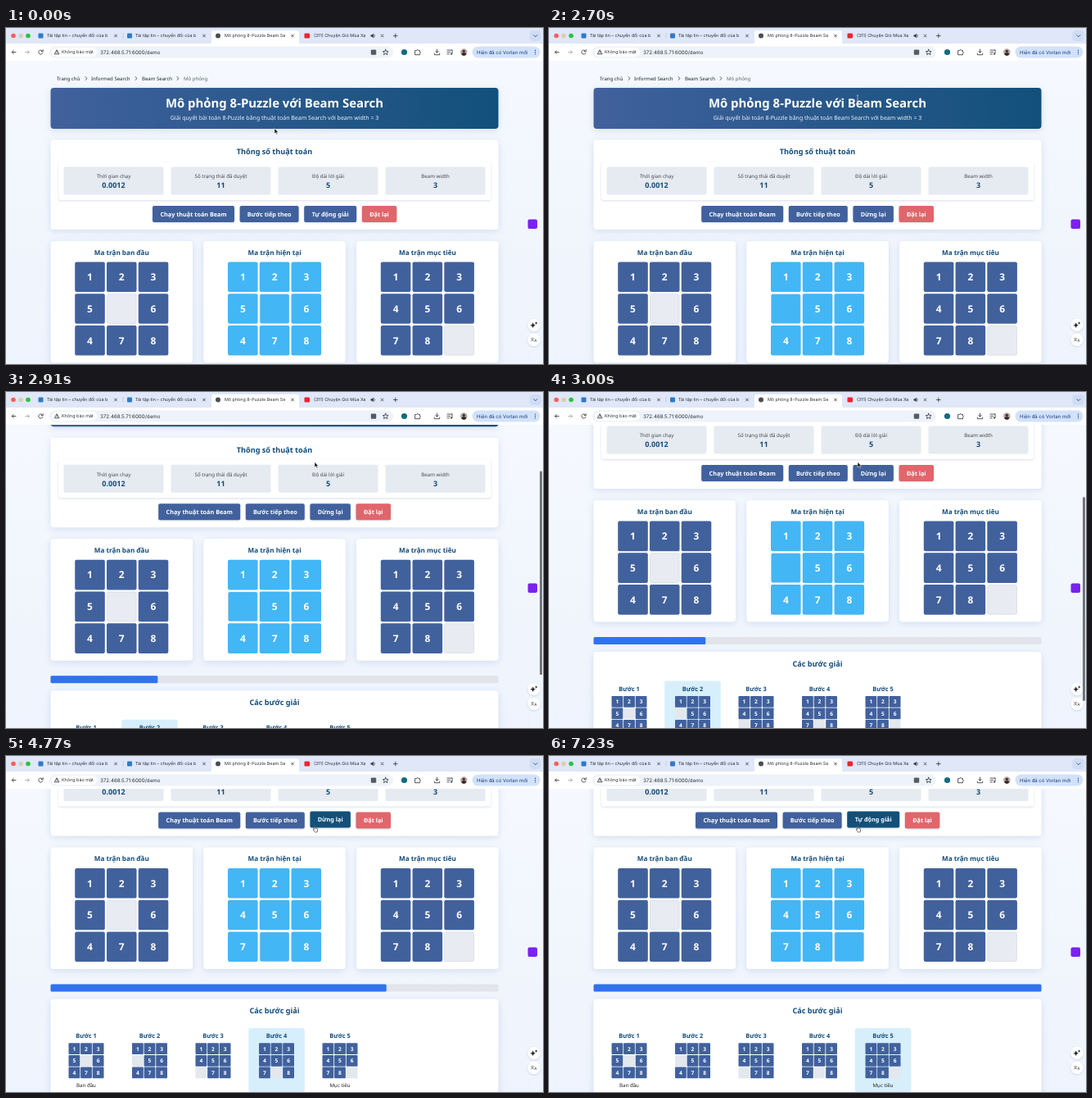
An HTML page that plays this animation: 656 px wide and 410 px high, repeating every 7.59 s.

```html
<!DOCTYPE html>
<html lang="vi">
<head>
<meta charset="utf-8">
<title>8-Puzzle</title>
<style>
html, body { margin: 0; width: 100%; height: 100%; overflow: hidden; background: #f2f6fd; }
svg { display: block; font-family: "Noto Sans", "Open Sans", sans-serif; text-rendering: geometricPrecision; }
.ui { font-family: Inter, Roboto, sans-serif; }
.mid { text-anchor: middle; }
.bold { font-weight: 700; }
.card { filter: drop-shadow(0 2px 4px rgba(60, 100, 170, .17)); }
.soft { filter: drop-shadow(0 1px 1px rgba(60, 90, 140, .2)); }
.line { fill: none; stroke: #41454c; stroke-width: .9; stroke-linecap: round; stroke-linejoin: round; }
</style>
</head>
<body>
<svg width="656" height="410" viewBox="0 0 656 410">
  <defs>
    <linearGradient id="banner"><stop stop-color="#41619d"/><stop offset="1" stop-color="#12507b"/></linearGradient>
    <linearGradient id="sky" x2="0" y2="1"><stop stop-color="#f6f9fe"/><stop offset="1" stop-color="#eef4fd"/></linearGradient>
  </defs>
  <rect width="656" height="410" fill="url(#sky)"/>
  <g id="page"><g id="fixed"></g><g id="live"></g></g>
  <g id="browser" class="ui"></g>
  <g id="over"></g>
</svg>
<script>
const LOOP = 7590, BLUE = '#41619d', NAVY = '#124c7c', SKY = '#43b6f5';
const TICK = 2697, PERIOD = 900, FADE = 270;
const BOARDS = ['1235 6478', '123 56478', '123456 78', '1234567 8', '12345678 '];
const $ = id => document.getElementById(id);

const rect = (x, y, w, h, r, fill, more = '') =>
  `<rect x="${x}" y="${y}" width="${w}" height="${h}" rx="${r}" fill="${fill}" ${more}/>`;
const text = (s, x, y, size, fill, cls = 'mid') =>
  `<text x="${x}" y="${y + size * .36}" font-size="${size}" fill="${fill}" class="${cls}">${s}</text>`;
const bold = (s, x, y, size, fill) => text(s, x, y, size, fill, 'mid bold');
const circle = (x, y, r, fill, more = '') => `<circle cx="${x}" cy="${y}" r="${r}" fill="${fill}" ${more}/>`;
const line = (d, more = '') => `<path class="line" d="${d}" ${more}/>`;

const ramp = (t, a, b) => Math.min(1, Math.max(0, (t - a) / (b - a)));
const smooth = x => x * x * (3 - 2 * x);
const easeOut = x => 1 - (1 - x) ** 2;
const blend = (a, b, k) => `rgb(${a.map((v, i) => Math.round(v + (b[i] - v) * k))})`;

function board(cells, x, y, fill, empty) {
  return [...cells].map((n, i) => {
    const cx = x + i % 3 * 38.75, cy = y + Math.floor(i / 3) * 38.75;
    return n === ' '
      ? rect(cx + .4, cy + .4, 35.8, 35.8, 2, empty, 'stroke="#bcc5d3" stroke-width=".7" stroke-dasharray="1.4 1"')
      : rect(cx, cy, 36.6, 36.6, 2, fill) + bold(n, cx + 18.3, cy + 18.3, 11.9, '#fff');
  }).join('');
}

function miniBoard(cells, x, y) {
  return [...cells].map((n, i) => {
    const cx = x + i % 3 * 14.6, cy = y + Math.floor(i / 3) * 14.6;
    return rect(cx, cy, 13.8, 13.8, .8, n === ' ' ? '#e3e7ee' : BLUE) +
      bold(n, cx + 6.9, cy + 6.9, 6.6, '#fff');
  }).join('');
}

const stepX = i => 98 + i * 77.5;

function drawPage() {
  const crumbs = [['Trang chủ', 62], ['Informed Search', 104], ['Beam Search', 166], ['Mô phỏng', 217]];
  const stats = [['Thời gian chạy', '0.0012'], ['Số trạng thái đã duyệt', '11'], ['Độ dài lời giải', '5'], ['Beam width', '3']];
  const titles = ['Ma trận ban đầu', 'Ma trận hiện tại', 'Ma trận mục tiêu'];
  $('fixed').innerHTML =
    crumbs.map(([s, x], i) => text(s, x, 61.5, 6.05, i < 3 ? '#1d2530' : '#5d6570', '')).join('') +
    [97, 158, 209].map(x => line(`M${x} 59.5l2 2-2 2`, 'stroke-width=".6"')).join('') +
    rect(54.5, 73, 547, 50, 4, 'url(#banner)', 'class="card"') +
    bold('Mô phỏng 8-Puzzle với Beam Search', 328, 91.7, 14.9, '#fff') +
    text('Giải quyết bài toán 8-Puzzle bằng thuật toán Beam Search với beam width = 3', 328, 109, 7, '#eef3fa') +
    rect(54.5, 136.5, 547, 109.5, 4, '#fff', 'class="card"') +
    bold('Thông số thuật toán', 328, 151, 9.12, NAVY) +
    rect(64, 163.5, 528.5, 46.5, 3, '#fff', 'class="soft"') +
    stats.map(([name, value], i) => {
      const x = 70.5 + i * 131;
      return rect(x, 169.5, 122, 34, 2, '#e6eaf1') +
        text(name, x + 61, 181, 6.15, '#444b55') + bold(value, x + 61, 192, 9, NAVY);
    }).join('') +
    titles.map((s, i) => {
      const x = 54.5 + i * 186.8;
      return rect(x, 260, 173.6, 148.5, 4, '#fff', 'class="card"') + bold(s, x + 86.8, 273.7, 8.15, NAVY);
    }).join('') +
    board(BOARDS[0], 84.2, 285.5, BLUE, '#e8ecf2') +
    board(BOARDS[4], 457.8, 285.5, BLUE, '#e8ecf2') +
    rect(54.5, 427, 547, 9, 2, '#e1e4ea') +
    rect(54.5, 445, 547, 140, 4, '#fff', 'class="card"') +
    bold('Các bước giải', 328, 459.7, 9.12, NAVY);
}

function drawBrowser() {
  const ink = '#2b2f36';
  const cross = x => line(`M${x - 1.4} 8.1l2.8 2.8m0-2.8l-2.8 2.8`, 'stroke-width=".6"');
  const file = 'Tải tập tin – chuyển đổi của b';
  const label = (s, x, y, size) => text(s, x, y, size, ink, '');
  $('browser').innerHTML =
    rect(0, 0, 656, 20, 0, '#dfe7f8') + rect(0, 19, 656, 21, 0, '#fff') +
    circle(9, 9.5, 2.8, '#fb5e58') + circle(18, 9.5, 2.8, '#dccfae') + circle(27, 9.5, 2.8, '#2ac23f') +
    rect(39.5, 6.5, 6, 6, 1, '#2d7bc9') + label(file, 50, 9.5, 5.4) + cross(134) +
    rect(148, 6.5, 6, 6, 1, '#2d7bc9') + label(file, 158, 9.5, 5.4) + cross(242) +
    line('M143 6.5v6', 'style="stroke:#aab4c8;stroke-width:.5"') +
    '<path d="M248 20q3 0 3-3V6q0-3 3-3h101q3 0 3 3v11q0 3 3 3z" fill="#fff"/>' +
    circle(259, 9.5, 3, '#4a4e55') + label('Mô phỏng 8-Puzzle Beam Se', 267, 9.5, 5.4) + cross(350) +
    rect(364.5, 6.5, 6.5, 6, 1, '#f0222f') + label('(311) Chuyện Gió Mùa Xa', 376, 9.5, 5.4) +
    `<path d="M445.5 8.4h1.4l1.8-1.6v5.4l-1.8-1.6h-1.4z" fill="${ink}"/>` + line('M449.8 8q1.3 1.5 0 3', 'stroke-width=".6"') +
    cross(459.5) + line('M473.5 9.5h4.6m-2.3-2.3v4.6', 'stroke-width=".7"') +
    rect(639.5, 3, 14, 13, 4, '#cfdcf5') + line('M644.8 8.7l2 2 2-2') +
    // toolbar
    line('M12 29.5H7.3m2-2.1l-2.1 2.1 2.1 2.1') +
    line('M23.6 29.5h4.7m-2-2.1l2.1 2.1-2.1 2.1', 'style="stroke:#a9adb5"') +
    line('M44.7 28.3a2.6 2.6 0 1 0 .2 2M45.2 26.6v1.9h-1.9') +
    rect(53, 22.5, 420, 14, 7, '#eef2fa') + rect(56, 24, 55, 11, 5.5, '#fff') +
    line('M62.3 27l2.7 4.8h-5.4zM62.3 28.8v1.2', 'stroke-width=".6"') +
    text('Không bảo mật', 68, 29.5, 5.4, ink, 'ui') +
    label('372.468.5.71:6000/demo', 115, 29.5, 6.2) +
    rect(445.8, 26.4, 6.4, 6.4, 1, '#555b66') +
    line('M463.7 26.2l1 2.2 2.4.2-1.8 1.6.6 2.4-2.2-1.3-2.2 1.3.6-2.4-1.8-1.6 2.4-.2z', 'stroke-width=".7"') +
    circle(486.5, 29.5, 3.6, '#126c7d') +
    line('M500 27.4h1.8q.9-2.4 1.8 0h1.9v1.9q2.3.8 0 1.7v1.7h-5.5z') +
    line('M526.5 26v4m-2-1.8l2 2 2-2M523.3 31v1.7h6.4V31') +
    line('M539 27h6m-6 2.4h3.5m-3.5 2.4h2.4M545 27v4.3') + circle(544, 31.6, 1.1, '#41454c') +
    circle(559.3, 29.5, 4.2, '#b7a59e') + circle(559.3, 28.3, 1.5, '#33282b') +
    '<path d="M556.4 32.5q0-2.6 2.9-2.6t2.9 2.6q-2.8 2.4-5.8 0z" fill="#33282b"/>' +
    rect(569.5, 22.5, 83, 14, 7, '#d2e2fc') + text('Hiện đã có Vorlan mới', 575, 29.5, 6, '#173a70', '') +
    [27.2, 29.5, 31.8].map(y => circle(646.5, y, .65, '#173a70')).join('') +
    // floating tools
    rect(637.5, 233.5, 11.5, 11.5, 2, '#7a22ee') +
    circle(645, 362.5, 7.7, '#fff', 'class="soft"') + circle(645, 380.5, 7.7, '#fff', 'class="soft"') +
    '<path d="M643.7 359.5q.5 2.8 3.3 3.3-2.8.5-3.3 3.3-.5-2.8-3.3-3.3 2.8-.5 3.3-3.3zM647.7 358.3q.3 1.5 1.8 1.8-1.5.3-1.8 1.8-.3-1.5-1.8-1.8 1.5-.3 1.8-1.8z" fill="#23262c"/>' +
    '<text x="640.8" y="382" font-size="4.8" font-family="Noto Sans CJK SC, sans-serif" fill="#23262c">文<tspan dy="1.4">A</tspan></text>';
}

function buttons(running, hover) {
  const items = [['Chạy thuật toán Beam', 100], ['Bước tiếp theo', 72],
    running ? ['Dừng lại', 49.5] : ['Tự động giải', 64], ['Đặt lại', 42.5]];
  let x = running ? 186.2 : 179;
  return items.map(([s, w], i) => {
    const k = i === 2 ? hover : 0, y = 217 - k;
    const fill = i === 3 ? '#e0666b' : blend([65, 97, 157], [19, 80, 122], k);
    const out = rect(x, y, w, 20, 2, fill, 'class="soft"') + bold(s, x + w / 2, y + 10, 7.25, '#fff');
    x += w + 6.6;
    return out;
  }).join('');
}

// time, x, y
const PATH = [[30, 328, 122.5], [780, 414, 190], [870, 413, 190.5], [1290, 394, 226], [2340, 394, 226], [2640, 377, 85.5], [LOOP, 377, 85.5]];

function pointer(t) {
  const i = Math.max(1, PATH.findIndex(p => p[0] > t));
  const [a, x0, y0] = PATH[i - 1], [b, x1, y1] = PATH[i], k = smooth(ramp(t, a, b));
  return [x0 + (x1 - x0) * k, y0 + (y1 - y0) * k];
}

const ARROW = '<path d="M0 0V6.4L1.5 5.1 2.5 7.3 3.6 6.8 2.6 4.7H4.6Z" fill="#111" stroke="#fff" stroke-width=".5"/>';
const HAND = '<path d="M-.3 0q.8-.5 1 .5V2.6q.8-.3 1 .3.8-.3 1 .3.9-.1.9.8V5.6q0 1.9-1.7 1.9H.8Q-.3 7-1.7 4.3-1.7 3.3-.6 4V.5z" fill="#fff" stroke="#111" stroke-width=".6"/>';
const BEAM = '<path d="M-1.3-3.6Q0-3.6 0-2.8V2.8Q0 3.6 1.3 3.6M1.3-3.6Q0-3.6 0-2.8M0 2.8Q0 3.6-1.3 3.6" fill="none" stroke="#c3cedd" stroke-width=".7"/>';

function render(t) {
  const step = Math.min(4, Math.max(0, Math.floor((t - TICK) / PERIOD) + 1));
  const since = step ? t - TICK - (step - 1) * PERIOD : 0;
  const done = step ? (step - 1 + easeOut(ramp(since, 0, FADE))) / 4 : 0;
  const scroll = 148.5 * smooth(ramp(t, 2710, 3090));
  const running = t >= 1800 && t < 6300;
  const hover = easeOut(ramp(t, 1180, 1450)) - easeOut(ramp(t, 2390, 2660)) + easeOut(ramp(t, 3000, 3270));

  $('page').setAttribute('transform', `translate(0 ${-scroll})`);
  $('live').innerHTML =
    buttons(running, hover) +
    board(BOARDS[step], 271, 285.5, SKY, SKY) +
    rect(54.5, 427, 547 * done, 9, 1.5, '#2f73ef') +
    rect(stepX(step) - 34.3, 480.5, 68.6, 78, 3, '#d7effb') +
    BOARDS.map((cells, i) => bold(`Bước ${i + 1}`, stepX(i), 490.2, 7.4, NAVY) + miniBoard(cells, stepX(i) - 21.5, 498.8)).join('') +
    text('Ban đầu', stepX(0), 550.3, 6.15, '#222') + text('Mục tiêu', stepX(4), 550.3, 6.15, '#222');

  const [x, y] = pointer(t), top = y + scroll;
  const shape = top > 217 && top < 237 ? HAND : top > 81 && top < 102 && t > 2400 ? BEAM : ARROW;
  const bar = ramp(t, 2710, 2760) - ramp(t, 3600, 3800);
  $('over').innerHTML =
    rect(652, 42 + scroll * .672, 3, 249, 1.5, '#70747c', `opacity="${bar}"`) +
    `<g transform="translate(${x} ${y})">${shape}</g>`;
}

drawPage();
drawBrowser();
(function frame() {
  render(performance.now() % LOOP);
  requestAnimationFrame(frame);
})();
</script>
</body>
</html>
```
